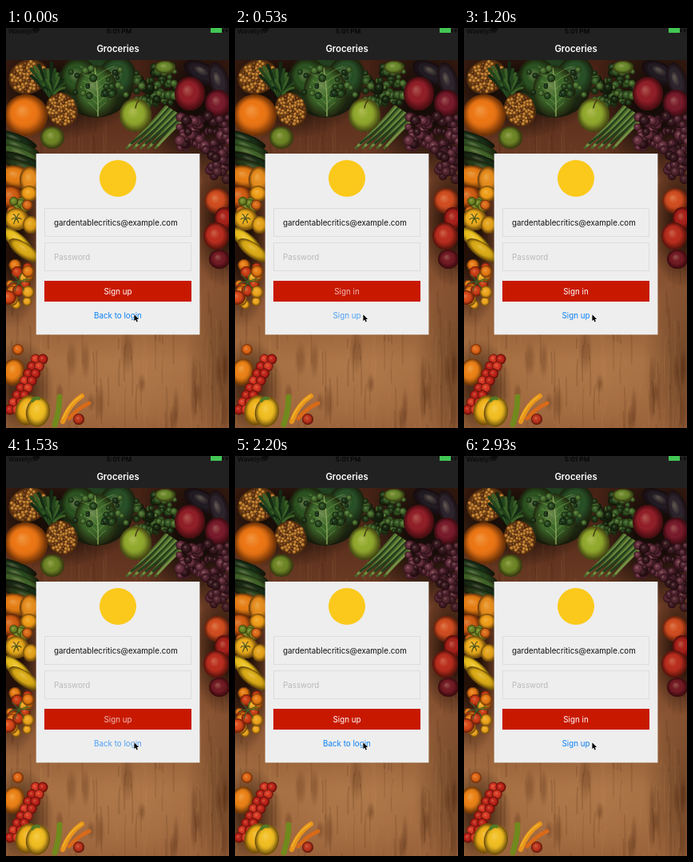
An HTML page with a canvas that plays this animation: 279 px wide and 500 px high, repeating every 2990 ms.

```html
<!DOCTYPE html>
<html lang="en">
<head>
<meta charset="utf-8">
<title>Groceries</title>
<style>
html, body { margin: 0; width: 100%; height: 100%; overflow: hidden; background: #212121; }
canvas { display: block; width: 279px; height: 500px; }
</style>
</head>
<body>
<canvas id="stage"></canvas>
<script>
const W = 279, H = 500, LOOP = 2990, TICK = 200 / 3;
const FONT = 'Inter, Roboto, "Liberation Sans", sans-serif';
const dpr = window.devicePixelRatio || 1;

function layer(canvas) {
  canvas.width = W * dpr;
  canvas.height = H * dpr;
  const c = canvas.getContext('2d');
  c.scale(dpr, dpr);
  return c;
}

const stage = document.getElementById('stage');
const ctx = layer(stage);
const backdrop = document.createElement('canvas');
const bg = layer(backdrop);

let seed = 7;
function rnd() {
  seed = (seed * 16807) % 2147483647;
  return seed / 2147483647;
}
const span = (a, b) => a + (b - a) * rnd();

function rect(c, x, y, w, h, fill) {
  c.fillStyle = fill;
  c.fillRect(x, y, w, h);
}

function text(str, x, y, size, fill, align = 'center', weight = 400, alpha = 1) {
  ctx.globalAlpha = alpha;
  ctx.font = `${weight} ${size}px ${FONT}`;
  ctx.textAlign = align;
  ctx.fillStyle = fill;
  ctx.fillText(str, x, y);
  ctx.globalAlpha = 1;
}

// Shaded ellipse: lit at the upper left, darker at the rim
function blob(color, x, y, rx, ry = rx, turn = 0) {
  bg.save();
  bg.translate(x, y);
  bg.rotate(turn);
  bg.scale(rx, ry);
  bg.beginPath();
  bg.arc(0, 0, 1, 0, 7);
  bg.fillStyle = color;
  bg.fill();
  const g = bg.createRadialGradient(-0.2, -0.25, 0.05, 0, 0, 1);
  g.addColorStop(0, 'rgba(255,240,190,.25)');
  g.addColorStop(0.4, 'rgba(255,230,160,0)');
  g.addColorStop(0.65, 'rgba(20,4,0,.1)');
  g.addColorStop(1, 'rgba(20,4,0,.65)');
  bg.fillStyle = g;
  bg.fill();
  bg.restore();
}

// Soft-edged shadow or tint
function haze(rgb, alpha, x, y, rx, ry) {
  bg.save();
  bg.translate(x, y);
  bg.scale(rx, ry);
  const g = bg.createRadialGradient(0, 0, 0.3, 0, 0, 1);
  g.addColorStop(0, `rgba(${rgb},${alpha})`);
  g.addColorStop(1, `rgba(${rgb},0)`);
  rect(bg, -1, -1, 2, 2, g);
  bg.restore();
}

function cluster(n, colors, x0, y0, x1, y1, r0, r1) {
  for (let i = 0; i < n; i++) {
    blob(colors[i % colors.length], span(x0, x1), span(y0, y1), span(r0, r1));
  }
}

function stroke(color, width, x0, y0, cx, cy, x1, y1) {
  bg.strokeStyle = color;
  bg.lineWidth = width;
  bg.lineCap = 'round';
  bg.beginPath();
  bg.moveTo(x0, y0);
  bg.quadraticCurveTo(cx, cy, x1, y1);
  bg.stroke();
}

// Fan of strokes from one point
function leaves(x, y, len, from, to, n, colors, width) {
  for (let i = 0; i < n; i++) {
    const a = from + (to - from) * i / (n - 1);
    const l = len * span(0.7, 1.1);
    stroke(colors[i % colors.length], width, x, y,
      x + Math.cos(a) * l * 0.6, y + Math.sin(a) * l * 0.6 - 3,
      x + Math.cos(a) * l, y + Math.sin(a) * l);
  }
}

function pineapple(x, y, rx, ry, turn) {
  blob('#a0601f', x, y, rx, ry, turn);
  for (let i = 0; i < 70; i++) {
    const a = i * 2.4, r = Math.sqrt(i / 70) * 0.9;
    const u = Math.cos(a) * r * rx, v = Math.sin(a) * r * ry;
    blob(i % 3 ? '#bd7a2c' : '#6e3c14',
      x + u * Math.cos(turn) - v * Math.sin(turn),
      y + u * Math.sin(turn) + v * Math.cos(turn), 2.5);
  }
}

function wood() {
  const g = bg.createLinearGradient(0, 40, 0, H);
  [[0, '#452114'], [0.2, '#633520'], [0.6, '#875231'], [0.82, '#a87144'], [1, '#9a633b']]
    .forEach(([p, c]) => g.addColorStop(p, c));
  rect(bg, 0, 40, W, H - 40, g);
  haze('190,135,85', 0.3, 150, 440, 100, 65);
  haze('50,22,8', 0.35, 279, 420, 55, 110);
  for (let i = 0; i < 300; i++) {
    const x = span(0, W), y = span(40, H), bend = span(-3, 3);
    stroke(i % 2 ? 'rgba(60,25,8,.14)' : 'rgba(210,150,95,.09)', span(0.6, 2.4),
      x, y, x + bend, y + 15, x + bend / 2, y + span(10, 60));
  }
  for (let i = 0; i < 16; i++) {
    haze('70,32,12', 0.25, span(50, W), span(385, H), span(4, 10), span(12, 35));
  }
}

function cabbage() {
  blob('#1d3d1d', 113, 70, 46, 42);
  blob('#28501f', 92, 62, 23, 25, -0.4);
  blob('#244d25', 138, 63, 24, 28, 0.4);
  blob('#3a6629', 113, 79, 27, 32);
  stroke('#86a35a', 1.5, 115, 110, 116, 80, 111, 50);
  for (let i = 0; i < 6; i++) {
    const y = 104 - i * 9, reach = 11 + i * 2;
    for (const side of [-1, 1]) {
      stroke('rgba(130,165,85,.65)', 0.9, 114, y, 114 + side * reach * 0.5, y - 8,
        114 + side * reach, y - 11);
    }
  }
  cluster(28, ['#17351a', '#426e2e', '#23491f'], 75, 46, 153, 88, 2, 5);
}

function topProduce() {
  const dark = ['#132a14', '#24451c', '#3b6026'];
  haze('18,10,6', 0.9, 60, 75, 105, 65);
  haze('18,10,6', 0.95, 240, 95, 85, 95);
  pineapple(28, 61, 25, 21, -0.4);
  leaves(56, 87, 42, -2.3, -0.8, 13, dark, 4);
  cabbage();
  pineapple(70, 102, 19, 22, -0.5);
  leaves(60, 82, 20, -2.6, -0.5, 9, dark, 3);
  blob('#ec7412', 25, 109, 27, 26);
  blob('#6b8424', 58, 137, 15, 14);
  for (let i = 0; i < 5; i++) {
    blob(dark[i % 3], 12 + i * 3, 139 + i * 9, 28, 7, 0.35);
  }

  cluster(85, ['#1c3917', '#315824', '#12270f', '#426a2b'], 163, 47, 216, 98, 2, 6);
  blob('#66852a', 199, 49, 13, 8);
  blob('#1d1720', 246, 57, 26, 13, 0.5);
  blob('#28202a', 267, 67, 12, 25, -0.3);
  for (let i = 0; i < 14; i++) {
    stroke(['#49692a', '#748e43', '#243f1c'][i % 3], 3,
      151 + i * 3, 150 - (i % 3) * 3, 175 + i * 2.5, 128, 200 + i * 1.8, 98 + i * 1.2);
  }
  blob('#8e1b26', 230, 82, 19, 21);
  blob('#751729', 265, 94, 16, 17);
  blob('#8fa82c', 162, 109, 20, 21);
  stroke('#44371a', 1.5, 162, 100, 163, 94, 166, 91);
  cluster(75, ['#4c2030', '#622c3e', '#32151f'], 216, 108, 279, 153, 4, 7);
  cluster(24, ['#4c2030', '#32151f', '#5a2837'], 247, 152, 277, 190, 5, 7);
}

function sideProduce() {
  haze('25,10,4', 0.9, 8, 260, 40, 115);
  haze('25,10,4', 0.8, 274, 245, 42, 80);
  blob('#e37a12', 12, 186, 21, 14, 0.2);
  blob('#e48a1b', 30, 190, 13, 17);
  blob('#cf5b10', 6, 211, 15, 14);
  blob('#ee9b16', 29, 207, 11, 10);
  cluster(9, ['#8b9c28', '#6c8421', '#d96816'], 5, 216, 36, 229, 5, 7);
  blob('#edac1b', 13, 239, 15, 14);
  blob('#e2a018', 31, 246, 10, 11);
  leaves(13, 239, 7, 0, 5.2, 6, ['#55581a'], 1.3);
  blob('#e8bd1b', 14, 266, 24, 9, 0.7);
  blob('#d9a914', 23, 278, 23, 9, 0.6);
  cluster(18, ['#e57813', '#c93a14', '#eba31b'], 2, 294, 34, 346, 5, 8);
  leaves(16, 318, 13, 0, 6, 7, ['#43602a'], 1.2);
  blob('#d84618', 3, 337, 10, 9);
  blob('#cf4a1e', 264, 216, 16, 16);
  blob('#a51d18', 273, 238, 12, 14);
  blob('#b72a1c', 263, 260, 16, 17);
  blob('#6f1722', 267, 289, 13, 12);
}

function bottomProduce() {
  haze('35,14, 4', 0.65, 18, 450, 42, 62);
  blob('#de6414', 15, 402, 7, 7);
  blob('#ea7f14', 9, 430, 14, 17, 0.3);
  stroke('#4b6b2b', 2, 39, 412, 28, 445, 8, 470);
  for (let i = 0; i < 16; i++) {
    const k = Math.floor(i / 2);
    blob(i % 3 ? '#bd2016' : '#d53420', 37 - k * 4.6 + (i % 2) * 9, 414 + k * 9, 6.4);
  }
  blob('#eeb018', 27, 478, 15, 19, 0.3);
  blob('#f0bd20', 40, 480, 15, 19, 0.2);
  stroke('#537a25', 4, 33, 466, 36, 461, 41, 463);
  stroke('#718a1d', 7, 67, 461, 67, 478, 61, 496);
  stroke('#e9951b', 6, 95, 460, 79, 470, 71, 492);
  stroke('#d96a18', 5, 104, 469, 90, 475, 79, 488);
  stroke('#efb52a', 1.5, 94, 460, 79, 469, 71, 488);
  blob('#bd321b', 91, 489, 7, 7);
}

function paintBackdrop() {
  wood();
  topProduce();
  sideProduce();
  bottomProduce();
  rect(bg, 0, 0, W, 40, '#212121');
}

function statusBar() {
  text('Wavelyn', 3, 6.5, 8.2, '#050505', 'left');
  text('5:01 PM', 141.5, 6.5, 8.2, '#050505', 'center', 600);
  ctx.strokeStyle = '#050505';
  ctx.lineWidth = 1.3;
  for (const r of [2, 4.2, 6.4]) {
    ctx.beginPath();
    ctx.arc(38, 7, r, -2.3, -0.84);
    ctx.stroke();
  }
  rect(ctx, 256, 0, 14, 6, '#42c654');
  rect(ctx, 271, 2, 1.3, 3, '#050505');
  ctx.fill(new Path2D('M277 0l-3 3.6h2l-1 3 3-3.8h-2z'));
  text('Groceries', 140, 30, 11.3, '#fff', 'center', 600);
}

function field(y, str, color) {
  ctx.strokeStyle = '#dcdcdc';
  ctx.lineWidth = 1;
  ctx.strokeRect(48.5, y + 0.5, 183, 35);
  text(str, 60, y + 21.5, 9.8, color, 'left');
}

function pointer() {
  const p = new Path2D('M160.4 358.2v8l1.8-1.6 1.3 2.8 1.4-.7-1.2-2.6h2.4z');
  ctx.strokeStyle = 'rgba(255,255,255,.9)';
  ctx.lineWidth = 1;
  ctx.stroke(p);
  ctx.fillStyle = '#000';
  ctx.fill(p);
}

// Each switch: old captions fade out, a short blank, new ones fade in
const switches = [270, 1270, 2390];
const clamp = v => Math.max(0, Math.min(1, v));

function captions(t) {
  let signUp = true, alpha = 1;
  for (const s of switches) {
    const d = t - s;
    if (d < 0) break;
    if (d >= 130) signUp = !signUp;
    alpha = d < 130 ? 1 - d / 130 : clamp((d - 150) / 160);
  }
  return { signUp, alpha };
}

function draw(t) {
  ctx.drawImage(backdrop, 0, 0, W, H);
  statusBar();
  rect(ctx, 37.7, 157, 204.7, 226.3, '#eeeeee');
  ctx.fillStyle = '#fbc91b';
  ctx.beginPath();
  ctx.arc(140, 188, 23, 0, 7);
  ctx.fill();
  field(225, 'gardentablecritics@example.com', '#111');
  field(268, 'Password', '#b9b9bb');
  rect(ctx, 48, 316, 184, 26, '#c81900');

  const { signUp, alpha } = captions(t);
  text(signUp ? 'Sign up' : 'Sign in', 140, 332.6, 9.8, '#fff', 'center', 400, alpha);
  text(signUp ? 'Back to login' : 'Sign up', 140, 362.6, 9.8, '#0b80f5', 'center', 400, alpha);
  pointer();
}

paintBackdrop();
const start = performance.now();
function frame() {
  const t = (performance.now() - start) % LOOP;
  draw(Math.floor((t + 4) / TICK) * TICK);
  requestAnimationFrame(frame);
}
frame();
</script>
</body>
</html>
```
